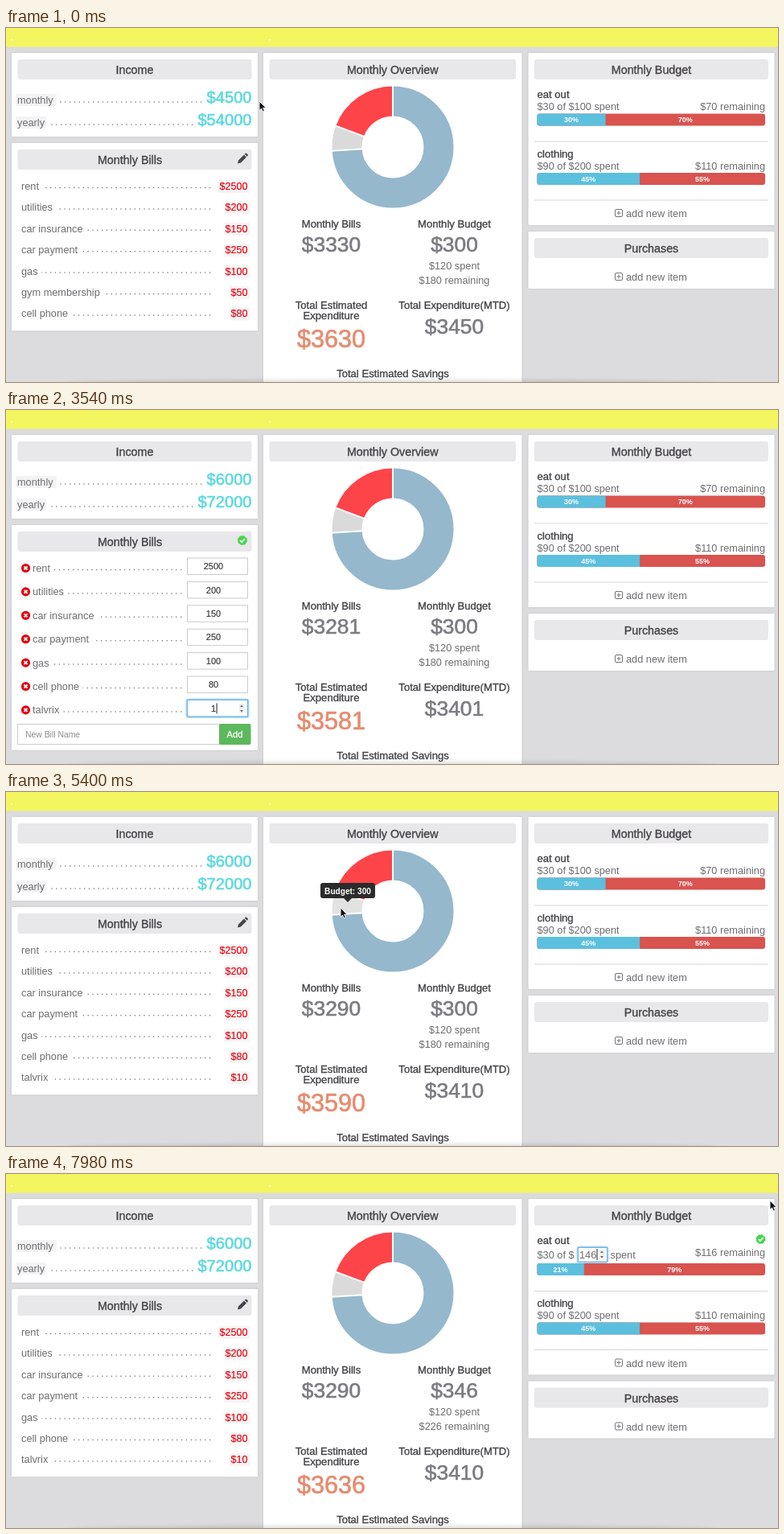
An HTML page that plays this animation: 960x440 px, repeating every 8000 ms.

```html
<!DOCTYPE html>
<html lang="en">
<head>
<meta charset="utf-8">
<title>Budget dashboard</title>
<style>
html, body { margin: 0; width: 100%; height: 100%; overflow: hidden; background: #fff }
svg { display: block; width: 960px; height: 440px }
text { font: 12.75px "Liberation Sans", Arial, sans-serif; fill: #6e6c70; white-space: pre }
.title { font-size: 14.3px; fill: #444246; stroke: #444246; stroke-width: .35 }
.head { font-size: 13.1px; fill: #444246; stroke: #444246; stroke-width: .35 }
.big { font-size: 26.4px; fill: #7c7a80; stroke: #7c7a80; stroke-width: .6 }
.total { font-size: 30.6px; fill: #e58c70; stroke: #e58c70; stroke-width: .7 }
.teal { fill: #5cd8de; stroke: #5cd8de; stroke-width: .6 }
.income { font-size: 20.1px }
.red { fill: #e3000f; font-size: 12.6px; stroke: #e3000f; stroke-width: .15 }
.bar { font-size: 9px; font-weight: bold; fill: #fff }
.field { font-size: 11px; fill: #333; stroke: #333; stroke-width: .15 }
.hint { font-size: 10.4px; fill: #8c8c8c }
.add { font-size: 11.2px; fill: #fff; stroke: #fff; stroke-width: .3 }
.tip { font-size: 10.1px; font-weight: bold; fill: #fff }
.label { stroke: #fff; stroke-width: 10; stroke-linejoin: round; paint-order: stroke }
.panel { fill: #fff; filter: drop-shadow(0 .5px 1px rgba(0, 0, 0, .12)) }
</style>
</head>
<body>
<svg id="stage" viewBox="0 0 960 440"></svg>
<script>
const stage = document.getElementById('stage');
const LOOP = 8000;

// Pointer stops: time, x, y
const stops = [
  [30, 315, 91], [330, 275, 87], [810, 262, 88], [1290, 264, 90], [1620, 293, 163],
  [1770, 295, 165], [1860, 294, 165], [2250, 23, 341], [2370, 23, 341], [2560, 110, 373],
  [2910, 110, 373], [3090, 284, 372], [3150, 284, 372], [3360, 255, 371], [3750, 255, 371],
  [3960, 293, 162], [4050, 293, 162], [4260, 475, 220], [4860, 475, 220], [5130, 436, 122],
  [5340, 416, 144], [5430, 416, 144], [5880, 937, 81], [5970, 937, 81], [6210, 731, 104],
  [7890, 735, 102], [7980, 950, 33]
];
const hidden = [[930, 1290], [2610, 2910], [3450, 3750], [6540, 7890]];
const beams = [[330, 930], [2540, 2610], [3340, 3450], [6190, 6540]];

const within = (t, list) => list.some(([a, b]) => t >= a && t < b);
const ramp = (t, a, b) => Math.max(0, Math.min(1, (t - a) / (b - a)));
const ease = p => p * p * (3 - 2 * p);
const typed = (t, start, step, word) => word.slice(0, Math.max(0, Math.floor((t - start) / step) + 1));

const text = (x, y, s, cls = '', anchor = 'start') =>
  `<text x="${x}" y="${y}" class="${cls}" text-anchor="${anchor}">${s}</text>`;
const mid = (x, y, s, cls) => text(x, y, s, cls, 'middle');
const end = (x, y, s, cls) => text(x, y, s, cls, 'end');
const rect = (x, y, w, h, fill, extra = '') =>
  `<rect x="${x}" y="${y}" width="${w}" height="${h}" fill="${fill}" ${extra}/>`;
const path = (d, extra) => `<path d="${d}" ${extra}/>`;
const move = (x, y, s) => `<g transform="translate(${x} ${y})">${s}</g>`;

const panel = (x, y, w, h, title, center = x + w / 2) => rect(x, y, w, h, '#fff', 'class="panel" rx="1"') +
  rect(x + 7.5, y + 8, w - 15, 25, '#e8e7e9', 'rx="3"') + mid(center, y + 26, title, 'title');
const dots = (a, b, y) => path(`M${a} ${y}H${b}`,
  'stroke="#706e72" stroke-width="1.5" stroke-linecap="round" stroke-dasharray="0 5.82"');
const input = (x, y, w, h, focus) => (focus
  ? rect(x, y, w, h, 'none', 'stroke="#a9d6f5" stroke-width="4" rx="2"') : '') +
  rect(x, y, w, h, '#fff', `stroke="${focus ? '#66afe9' : '#ccc'}"`);
const caret = (x, y, h) => rect(x, y, 1, h, '#222');
const spinner = (x, y) => rect(x - 3.5, y - 6, 7, 12, '#f0f0f0', 'rx="2"') +
  path(`M${x - 2} ${y - 2}l2 -2.5 2 2.5zM${x - 2} ${y + 2}l2 2.5 2 -2.5z`, 'fill="#666"');

const check = (x, y) => move(x, y, '<circle r="5.6" fill="#43d64b" stroke="#43d64b" stroke-dasharray="2.2 2.2"/>' +
  path('M-2.8 .2L-.7 2.2 3 -1.8', 'fill="none" stroke="#fff" stroke-width="1.8"'));
const remove = (x, y) => move(x, y, '<circle r="5.6" fill="#e3000f"/>' +
  path('M-2 -2L2 2M2 -2L-2 2', 'stroke="#fff" stroke-width="1.8"'));
const pencil = (x, y) => move(x, y, path(
  'M-6 6L-5 2 2 -5 5 -2 -2 5zM2.8 -5.8L4 -7Q5 -7.3 7 -4.8 7 -4 5.8 -2.8z', 'fill="#464448"'));
const addItem = y => rect(757.5, y - 9.5, 9, 9, 'none', 'rx="1.5" stroke="#747276"') +
  path(`M759.5 ${y - 5}h5m-2.5 -2.5v5`, 'stroke="#747276"') + text(771, y, 'add new item');

function income(s) {
  const d = s.editIncome ? 3 : 0, year = '$' + s.income * 12;
  const out = panel(7, 31, 306, 104 + d, 'Income') +
    rect(12, 82, 51, 15, '#f4f3f4', 'rx="2"') + text(14, 94, 'monthly') +
    rect(12, 110 + d, 38, 15, '#f4f3f4', 'rx="2"') + text(14, 122 + d, 'yearly') +
    dots(68, s.editIncome ? 210 : 247, 92) + dots(57, 236, 120 + d) +
    end(305.5, 121 + d, year, 'income teal');
  if (!s.editIncome) return out + end(305.5, 93, '$' + s.income, 'income teal');
  return out + text(215, 94, '$', 'income teal') + input(229, 75, 75, 24, true) +
    (s.pickIncome ? rect(234, 77, 46, 20, '#b5d6f4') : '') +
    text(234, 94, s.income, 'income teal') + spinner(297, 87) +
    (s.pickIncome ? '' : caret(236 + 11.18 * String(s.income).length, 78, 18));
}

function bills(s) {
  const n = s.bills.length, box = h => panel(7, 143, 306, h, 'Monthly Bills', 154);
  if (!s.editBills) {
    return box(48.5 + 26.4 * n) + pencil(294, 162.5) +
      s.bills.map(([name, cost], i) => {
        const y = 201 + 26.4 * i, w = 11 + 7 * String(cost).length;
        return dots(44, 258, y - 2.5) + text(19, y, name, 'label') +
          rect(303 - w, y - 12, w, 16, '#f6f4f4', 'rx="2"') + end(300.5, y, '$' + cost, 'red');
      }).join('');
  }
  const bottom = 184 + 29.4 * n;
  return box(bottom - 110) + check(294, 162) +
    s.bills.map(([name, cost], i) => {
      const y = 196.5 + 29.4 * i, focus = s.focusBill && i == n - 1;
      let row = dots(60.5, 222, y + 2) + text(33, y + 4.5, name, 'label') + remove(24.5, y) +
        input(225.5, y - 12.5, 75, 20.5, focus);
      if (focus && cost == 0) row += rect(254.5, y - 8.5, 7, 13, '#b5d6f4');
      row += mid(258, y + 1.7, cost, 'field');
      if (focus) row += spinner(293, y - 2) + (cost ? caret(258.5 + 3.1 * String(cost).length, y - 8.5, 13) : '');
      return row;
    }).join('') +
    input(14.5, bottom + .7, 251, 25, s.focusName) +
    text(24, bottom + 17, s.name || 'New Bill Name', s.name ? 'field' : 'hint') +
    (s.focusName ? caret(24.5 + 4.9 * s.name.length, bottom + 7, 13) : '') +
    rect(265, bottom + .2, 39.5, 26, '#5cb85c', 'rx="2"') + mid(284.5, bottom + 17, 'Add', 'add');
}

function donut(hot) {
  const slice = (from, size, color) => `<circle r="57" fill="none" stroke="${color}" stroke-width="37" ` +
    `pathLength="4500" stroke-dasharray="${size} 4500" stroke-dashoffset="${-from}" transform="rotate(-90)"/>`;
  const cut = v => path('M0 -37V-77', `stroke="#fff" stroke-width="2" transform="rotate(${v * .08})"`);
  return move(481, 148, slice(0, 3330, '#95b8cd') + slice(3330, 300, hot ? '#e3e2e2' : '#dbdadb') +
    slice(3630, 870, '#fd4449') + cut(0) + cut(3330) + cut(3630));
}

function overview(s) {
  const due = s.bills.reduce((sum, b) => sum + b[1], 0), budget = s.eat + 200;
  let out = panel(320, 31, 321.5, 463.5, 'Monthly Overview') + donut(s.tip) +
    mid(404.5, 247.5, 'Monthly Bills', 'head') + mid(404.5, 278, '$' + due, 'big') +
    mid(557.5, 247.5, 'Monthly Budget', 'head') + mid(557.5, 278, '$' + budget, 'big') +
    mid(557.5, 300, '$120 spent') + mid(557.5, 318, `$${budget - 120} remaining`) +
    mid(404.5, 349, 'Total Estimated', 'head') + mid(404.5, 362, 'Expenditure', 'head') +
    mid(404.5, 397, '$' + (due + budget), 'total') +
    mid(557.5, 349, 'Total Expenditure(MTD)', 'head') + mid(557.5, 379.5, '$' + (due + 120), 'big') +
    mid(481, 434, 'Total Estimated Savings', 'head') +
    mid(481, 469, '$' + (s.income - due - budget), 'total teal');
  if (s.tip) out += rect(391, 113, 68, 19, '#2b2b2b', 'rx="3"') +
    path('M419 131h12l-6 6z', 'fill="#2b2b2b"') + mid(425, 126.5, 'Budget: 300', 'tip');
  return out;
}

function bar(y, part) {
  const w = 283.5 * part, pct = Math.round(part * 100);
  return rect(660.5, y, 283.5, 15, '#d9534f', 'rx="3"') +
    path(`M${660.5 + w} ${y}H663.5q-3 0 -3 3v9q0 3 3 3H${660.5 + w}z`, 'fill="#5bc0de"') +
    mid(660.5 + w / 2, y + 10.5, pct + '%', 'bar') +
    mid(660.5 + (w + 283.5) / 2, y + 10.5, 100 - pct + '%', 'bar');
}

function budget(s) {
  const d = s.editBudget ? 4.5 : 0, rule = y => rect(657, y, 291, 1, '#d6d5d7');
  let out = panel(649.5, 31, 306, 214 + d, 'Monthly Budget') + text(660.5, 87, 'eat out', 'head') +
    end(944, 102, `$${s.eat - 30} remaining`) + bar(106.5 + d, 30 / s.eat);
  if (s.editBudget) {
    out += check(938.5, 81) + text(660.5, 104.5, '$30 of $') + text(751.5, 104.5, 'spent') +
      input(711.5, 91.5, 36, 17.5, s.focusEat) +
      (s.pickEat ? rect(712.5, 93, 22, 14, '#b5d6f4') : '') + text(713, 104.5, s.eat) +
      (s.focusEat ? spinner(741, 100) : '') + (s.focusEat && !s.pickEat ? caret(734.5, 93, 14) : '');
  } else out += text(660.5, 102, `$30 of $${s.eat} spent`);
  return out + move(0, d, rule(140.5) + text(660.5, 160.5, 'clothing', 'head') +
    text(660.5, 175.5, '$90 of $200 spent') + end(944, 175.5, '$110 remaining') + bar(180, .45) +
    rule(213.5) + addItem(235) + panel(649.5, 253, 306, 71, 'Purchases') + addItem(314));
}

function pointer(t) {
  if (within(t, hidden)) return '';
  let i = stops.findIndex(k => k[0] > t);
  if (i < 0) i = stops.length - 1;
  const b = stops[i], a = stops[Math.max(0, i - 1)];
  const p = ease(ramp(t, a[0], b[0] + (a == b))), at = j => a[j] + (b[j] - a[j]) * p;
  const x = at(1), y = at(2);
  if (within(t, beams)) return move(x, y, path('M-2.5 -6Q0 -6 0 -4.5 0 -6 2.5 -6M0 -5V5M-2.5 6Q0 6 0 4.5 0 6 2.5 6M-1.5 2h3',
    'fill="none" stroke="#111" stroke-width="1.2"'));
  return move(x, y, path('M0 0V11.5L2.6 9.1 4.4 13 6.4 12.1 4.7 8.3H8.2z',
    'fill="#111" stroke="#fff" stroke-width=".9"'));
}

function stateAt(t) {
  const list = [['rent', 2500], ['utilities', 200], ['car insurance', 150], ['car payment', 250],
    ['gas', 100], ['gym membership', 50], ['cell phone', 80]];
  if (t >= 2340) list.splice(5, 1);
  if (t >= 3120) list.push(['talvrix', t < 3540 ? 0 : t < 3600 ? 1 : 10]);
  return {
    bills: list,
    income: t < 930 ? 4500 : +typed(t, 930, 70, '6000'),
    editIncome: within(t, [[360, 1290]]),
    pickIncome: within(t, [[600, 930]]),
    editBills: within(t, [[1680, 4020]]),
    focusName: within(t, [[2580, 3120]]),
    focusBill: within(t, [[3390, 3750]]),
    name: t < 3120 ? typed(t, 2640, 36, 'talvrix') : '',
    scroll: ease(ramp(t, 4290, 4530)) - ease(ramp(t, 4620, 4860)),
    tip: within(t, [[5250, 5500]]),
    editBudget: t >= 5940,
    focusEat: t >= 6240,
    pickEat: within(t, [[6270, 6540]]),
    eat: 100 + Math.ceil(46 * ramp(t, 6540, 7800))
  };
}

function draw(t) {
  const s = stateAt(t), page = -5.5 * s.scroll;
  const leftShift = s.editIncome ? 3 : 0;
  return '<defs><filter id="soft" x="-10%" y="-200%" width="120%" height="500%"><feGaussianBlur stdDeviation="8 2"/></filter></defs>' +
    move(0, page, rect(0, 0, 960, 440.5, '#dcdbde') + income(s) + move(0, leftShift, bills(s)) + budget(s) +
      move(0, -61 * s.scroll, overview(s)) + rect(0, 0, 960, 23.5, '#f3f65f') +
      rect(6, 14, 2, 1.5, '#fdfde0') + rect(327, 14, 2, 1.5, '#fdfde0')) +
    (s.scroll > 0 ? rect(635, 428 + 40 * (1 - s.scroll), 5, 6, '#6d6c6e', 'rx="2.5"') : '') +
    '<ellipse cx="480" cy="442" rx="405" ry="5" fill="#000" opacity=".12" filter="url(#soft)"/>' +
    pointer(t);
}

let last = '';
function frame(now) {
  const picture = draw(now % LOOP);
  if (picture !== last) stage.innerHTML = last = picture;
  requestAnimationFrame(frame);
}
frame(performance.now());
</script>
</body>
</html>
```
